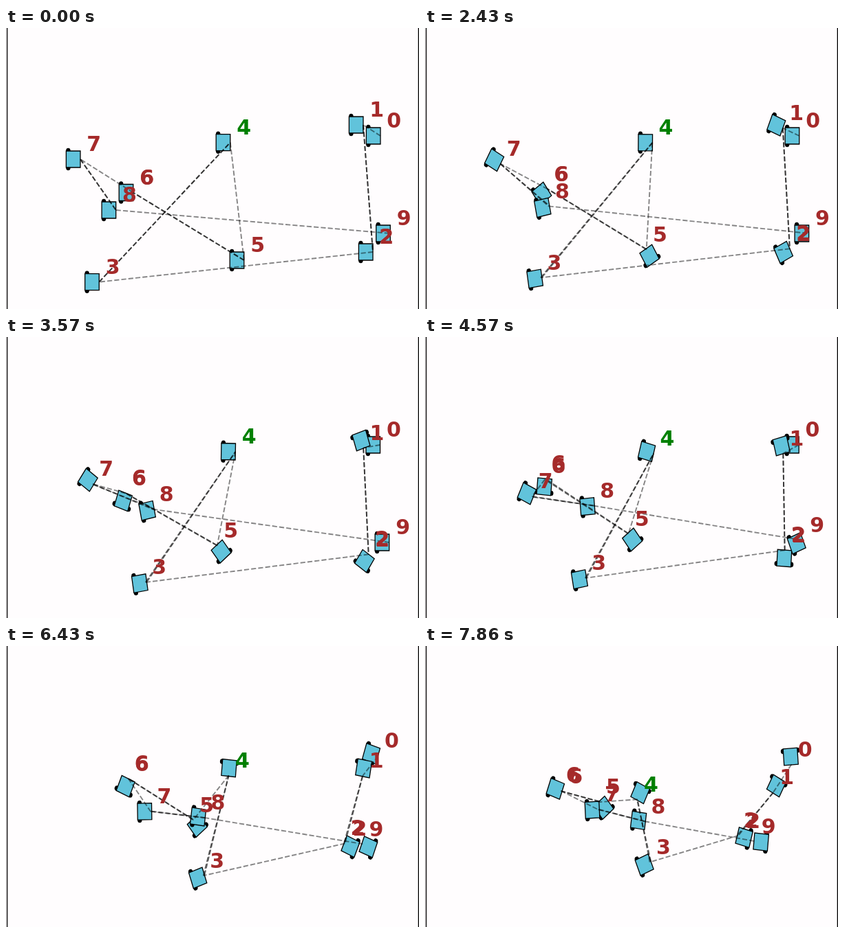
These frames come from a looping animation (600 px wide and 409 px high, 8000 ms). An HTML page with a canvas:

```html
<!DOCTYPE html>
<html lang="en">
<head>
<meta charset="utf-8">
<title>Robot formation</title>
<style>
  html, body { margin: 0; width: 100%; height: 100%; overflow: hidden; background: #fffdfe; }
  canvas { display: block; width: 600px; height: 409px; }
</style>
</head>
<body>
<canvas id="stage" width="600" height="409"></canvas>
<script>
const ctx = document.getElementById('stage').getContext('2d');

const LOOP = 8000, HOLD = 1430, FPS = 7, LAST = 46;
const HALF = 10.3;      // half the side of a robot, also centre to nose
const STRETCH = 1.165;  // vertical over horizontal scale of the view
const LEADER = 4;

// Waypoints [step, x, y] of each robot's nose; headings follow from the motion.
const routes = [
  [[0, 544, 157], [27, 543, 157], [41, 537.7, 164], [LAST, 532, 173]],
  [[0, 519, 141], [8, 519.8, 146], [16, 519.2, 162], [30, 521.5, 178], [LAST, 505.5, 214]],
  [[0, 533, 326], [23, 522.5, 310], [30, 509.5, 295], [LAST, 453.7, 275.5]],
  [[0, 135.3, 369.7], [30, 264, 343], [LAST, 328.2, 313.8]],
  [[0, 325.8, 166.7], [16, 333.3, 167], [30, 329, 176], [LAST, 308.2, 224.5]],
  [[0, 345.8, 338], [8, 320.8, 321.5], [23, 294.8, 285.5], [LAST, 253, 226]],
  [[0, 184.8, 239.5], [16, 173.6, 227], [30, 175.5, 189], [41, 181.4, 200], [LAST, 199, 211.8]],
  [[0, 108, 191], [8, 109.6, 198], [30, 187.8, 241.5], [LAST, 253.3, 238]],
  [[0, 159.7, 265], [8, 180.9, 259], [23, 246.3, 245.6], [LAST, 320.3, 255.4]],
  [[0, 558.3, 299], [16, 556.7, 299], [30, 534.9, 290.7], [LAST, 477.9, 284]]
];

// Cubic interpolation through the waypoints that never overshoots.
function curve(points, axis, s) {
  const slope = i => (points[i + 1][axis] - points[i][axis]) / (points[i + 1][0] - points[i][0]);
  const tangent = i => {
    if (i === 0) return slope(0);
    if (i === points.length - 1) return slope(i - 1);
    const a = slope(i - 1), b = slope(i);
    return a * b <= 0 ? 0 : 2 * a * b / (a + b);
  };
  let i = 0;
  while (i < points.length - 2 && s > points[i + 1][0]) i++;
  const h = points[i + 1][0] - points[i][0], u = (s - points[i][0]) / h;
  const u2 = u * u, u3 = u2 * u;
  return points[i][axis] * (2 * u3 - 3 * u2 + 1) + points[i + 1][axis] * (3 * u2 - 2 * u3) +
    h * (tangent(i) * (u3 - 2 * u2 + u) + tangent(i + 1) * (u3 - u2));
}

function noseAt(id, step) {
  const s = Math.max(0, step);
  return [curve(routes[id], 1, s), curve(routes[id], 2, s)];
}

// A robot turns by the sideways part of its nose's motion.
function traceHeadings(id) {
  const SUB = 20, turns = [0];
  let angle = 0;
  let [x, y] = noseAt(id, 0);
  for (let n = 1; n <= LAST * SUB; n++) {
    const [nx, ny] = noseAt(id, n / SUB);
    angle += ((ny - y) / STRETCH * Math.cos(angle) - (nx - x) * Math.sin(angle)) / HALF;
    [x, y] = [nx, ny];
    if (n % SUB === 0) turns.push(angle);
  }
  return turns;
}

const ids = routes.map((_, id) => id);
const headings = ids.map(traceHeadings);

function drawRobot(id, step) {
  ctx.save();
  ctx.translate(...noseAt(id, step));
  ctx.scale(1, STRETCH);
  ctx.rotate(headings[id][step]);
  ctx.translate(-HALF, 0);
  ctx.fillStyle = '#000';
  for (const side of [-1, 1]) {
    ctx.beginPath();
    ctx.arc(-7.3, side * 10.7, 3.2, 0, 2 * Math.PI);
    ctx.fill();
  }
  ctx.beginPath();
  ctx.rect(-HALF, -HALF, 2 * HALF, 2 * HALF);
  ctx.restore();
  ctx.fillStyle = '#61c3db';
  ctx.fill();
  ctx.strokeStyle = '#000';
  ctx.lineWidth = 1.3;
  ctx.stroke();
}

function drawLink(id, step, alpha) {
  ctx.strokeStyle = `rgba(0, 0, 0, ${alpha})`;
  ctx.beginPath();
  ctx.moveTo(...noseAt(id, step));
  ctx.lineTo(...noseAt(id + 1, step));
  ctx.stroke();
}

function drawLabel(id, step) {
  const [x, y] = noseAt(id, step);
  ctx.fillStyle = id === LEADER ? '#008000' : '#a52a2a';
  ctx.fillText(id, x + 19.8, y - 11.6);
}

function draw(step) {
  ctx.fillStyle = '#fffdfe';
  ctx.fillRect(0, 0, 600, 409);
  ctx.fillStyle = '#000';
  ctx.fillRect(1, 0, 1.3, 409);
  ctx.fillRect(598.7, 0, 1.3, 409);

  ids.forEach(id => drawRobot(id, step));

  // Every other link is drawn twice, the first copy trailing a little.
  ctx.lineWidth = 1.9;
  ctx.setLineDash([7.2, 3.1]);
  for (const id of ids.slice(0, -1)) {
    const twice = id % 2 === 1;
    drawLink(id, step - 0.4, twice ? 0.55 : 0.48);
    if (twice) drawLink(id, step, 0.55);
  }
  ctx.setLineDash([]);

  ctx.font = 'bold 30px "DejaVu Sans", sans-serif';
  ctx.textAlign = 'center';
  for (const id of ids) {
    const lags = id % 4 === 2 ? [0.9, 0] : [0.4];
    lags.forEach(lag => drawLabel(id, step - lag));
  }
}

function frame() {
  const t = performance.now() % LOOP;
  const step = Math.floor((t - HOLD + 5) * FPS / 1000) + 1;
  draw(Math.min(LAST, Math.max(0, step)));
  requestAnimationFrame(frame);
}
frame();
</script>
</body>
</html>
```
